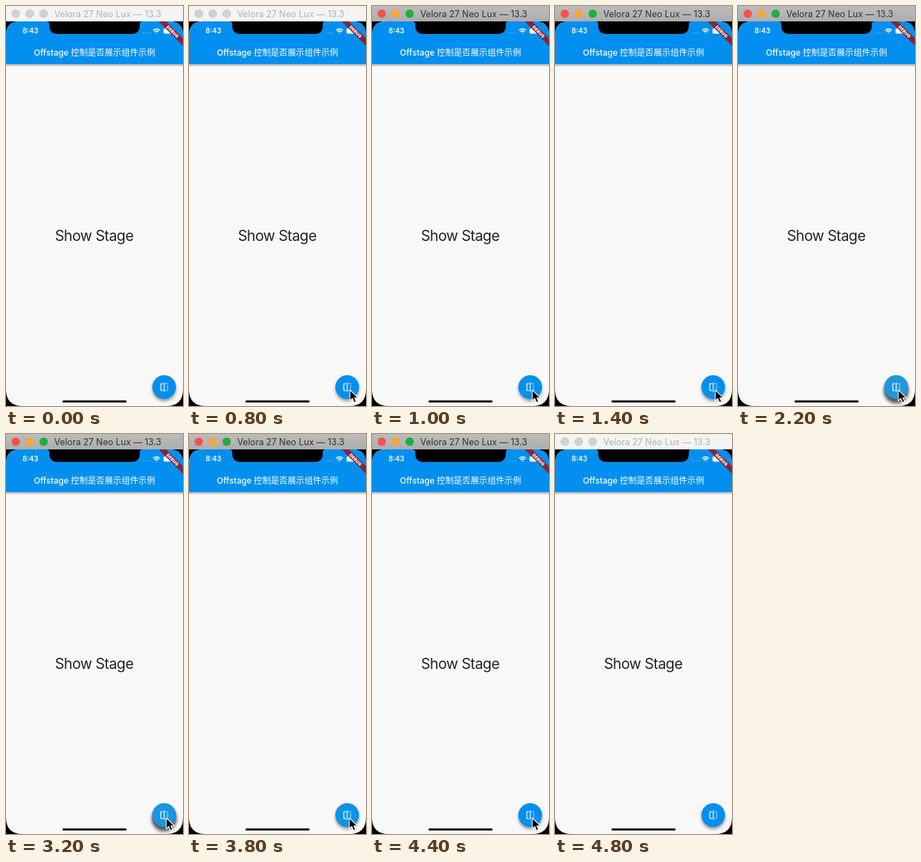
Recreate the animation shown at these times as an HTML page. Size 254 by 572 pixels, loop 5 s.

```html
<!DOCTYPE html>
<html lang="zh">
<head>
<meta charset="utf-8">
<style>
  html, body { margin: 0; width: 100%; height: 100%; overflow: hidden; background: #000; }
  svg { display: block; width: 100vw; height: 100vh; }
  text { font-family: Inter, "Noto Sans CJK SC", "Noto Sans CJK", sans-serif; text-anchor: middle; }

  .window-title { font-size: 12.7px; fill: #b1b1b1; }
  .active .window-title { fill: #303030; }
  .clock { font-size: 10px; font-weight: 600; fill: #fff; }
  .app-title { font-size: 12.1px; font-weight: 500; fill: #fff; }
  .message { font-size: 21px; letter-spacing: -.6px; fill: #242424; }
  .debug { font-size: 6.1px; font-weight: 900; letter-spacing: .2px; fill: #fff; }

  .active, .message, .cursor, .splash, .lift { animation: 5s step-end infinite; }
  .active { animation-name: focus; }
  .message { animation-name: toggle; }
  .cursor { animation-name: point; }
  .splash { animation-name: splash; }
  .lift { animation-name: lift; }

  @keyframes focus {
    0%, 96%, 100% { opacity: 0; }
    20% { opacity: 1; }
  }
  @keyframes toggle {
    0%, 44%, 64%, 80%, 100% { opacity: 1; }
    28%, 56%, 72% { opacity: 0; }
  }
  @keyframes point {
    0% { opacity: 0; transform: translate(240px, 561px); }
    8% { opacity: 1; transform: translate(240px, 561px); }
    12% { opacity: 1; transform: translate(231px, 549px); }
    20% { opacity: 1; transform: translate(230px, 549px); }
    92%, 100% { opacity: 0; transform: translate(230px, 549px); }
  }
  @keyframes splash {
    0%, 52%, 60%, 68%, 84%, 100% { opacity: 0; }
    44% { opacity: .75; }
    48%, 56%, 72%, 76% { opacity: .35; }
    64%, 80% { opacity: .6; }
  }
  @keyframes lift {
    0%, 52%, 68%, 84%, 100% { opacity: 0; }
    44%, 64%, 80% { opacity: .5; }
  }
</style>
</head>
<body>
<svg viewBox="0 0 254 572">
  <defs>
    <linearGradient id="chrome" x2="0" y2="1">
      <stop stop-color="#bdbcbd"/><stop offset="1" stop-color="#aeadae"/>
    </linearGradient>
    <linearGradient id="barShadow" x2="0" y2="1">
      <stop stop-color="#000" stop-opacity=".32"/><stop offset="1" stop-color="#000" stop-opacity="0"/>
    </linearGradient>
    <filter id="blur" x="-50%" y="-50%" width="200%" height="200%"><feGaussianBlur stdDeviation="2.2"/></filter>
    <clipPath id="screen"><path d="M0 42Q0 22 20 22H234Q254 22 254 42V548Q254 572 230 572H24Q0 572 0 548Z"/></clipPath>
  </defs>

  <!-- Simulator window bar -->
  <rect width="254" height="22" fill="#f4f4f4"/>
  <g fill="#d1d1d1" stroke="#c2c2c2" stroke-width=".6">
    <circle cx="14" cy="11" r="5.8"/><circle cx="34" cy="11" r="5.8"/><circle cx="54" cy="11" r="5.8"/>
  </g>
  <text class="window-title" x="146" y="16">Velora 27 Neo Lux — 13.3</text>
  <g class="active">
    <rect width="254" height="22" fill="url(#chrome)"/>
    <circle cx="14" cy="11" r="6" fill="#fc4f4b"/>
    <circle cx="34" cy="11" r="6" fill="#f2a83c"/>
    <circle cx="54" cy="11" r="6" fill="#20ad40"/>
    <text class="window-title" x="146" y="16">Velora 27 Neo Lux — 13.3</text>
  </g>

  <rect y="22" width="254" height="550" fill="#000"/>
  <g clip-path="url(#screen)">
    <rect y="22" width="254" height="550" fill="#f8f8f8"/>
    <rect y="83" width="254" height="4" fill="url(#barShadow)"/>
    <rect y="22" width="254" height="61" fill="#038fef"/>
    <path d="M58 22Q62 22 62 26V28Q62 40 74 40H180Q192 40 192 28V26Q192 22 196 22Z"/>

    <!-- Status bar -->
    <text class="clock" x="35" y="39.4">8:43</text>
    <path d="M196 38.5H208" stroke="#fff" stroke-opacity=".4" stroke-dasharray="1.5 1.7"/>
    <g fill="none" stroke="#fff" stroke-width="1.5">
      <path d="M211 34.8Q216 30.6 221 34.8M213 36.9Q216 34.4 219 36.9"/>
      <path d="M216 39.5L214.7 38.2Q216 37.2 217.3 38.2Z" fill="#fff" stroke="none"/>
    </g>
    <rect x="226" y="32" width="15" height="7.5" rx="2" fill="#fff"/>

    <text class="app-title" x="127" y="70.5">Offstage 控制是否展示组件示例</text>
    <g transform="translate(254 22) rotate(45)">
      <rect x="-45" y="17.2" width="90" height="7.6" fill="#842638"/>
      <text class="debug" y="23.2">DEBUG</text>
    </g>

    <text class="message" x="126.5" y="335.5">Show Stage</text>

    <!-- Floating button -->
    <circle cx="227" cy="548" r="17" opacity=".4" filter="url(#blur)"/>
    <circle class="lift" cx="227" cy="551" r="18" filter="url(#blur)"/>
    <circle cx="227" cy="545" r="17" fill="#038fef"/>
    <circle class="splash" cx="227" cy="545" r="17" fill="#279bd8"/>
    <g transform="translate(219.7 537.7) scale(.61)" fill="none" stroke="#fff" stroke-width="2">
      <path d="M9 4H5Q4 4 4 5V19Q4 20 5 20H9M12 1V23"/>
      <path d="M15 4H17M15 20H17M19 4H20V5M19 20H20V19M20 7V9M20 11V13M20 15V17"/>
    </g>
    <rect x="81" y="564" width="92" height="3" rx="1.5"/>
  </g>

  <path class="cursor" d="M0 0V15.5L3.6 12.2L6 18L9 16.8L6.6 11.2H11.4Z" stroke="#fff" stroke-width="1.1" stroke-linejoin="round"/>
</svg>
</body>
</html>
```
